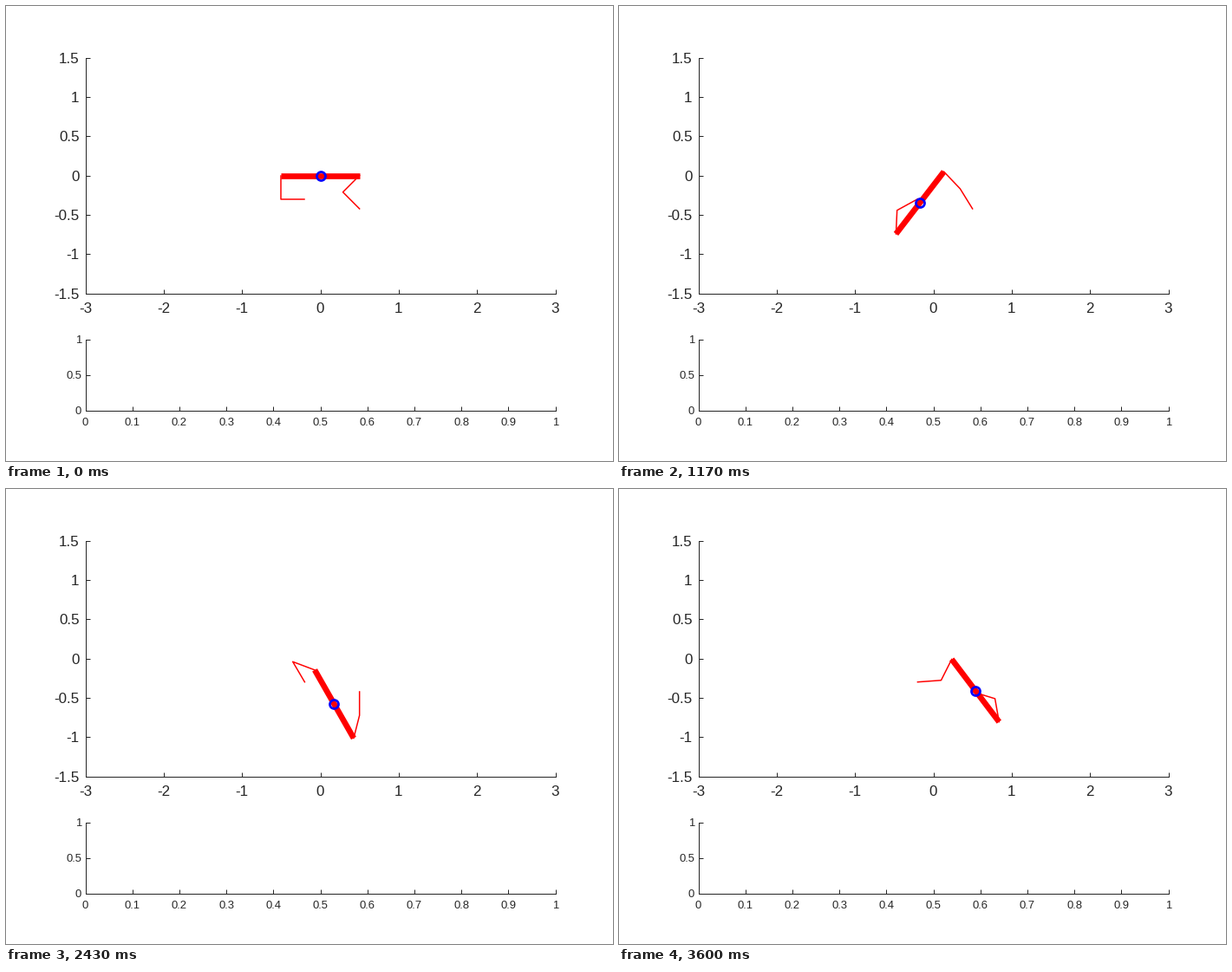
A matplotlib script that plays this animation: 700x525 px, repeating every 3.63 s.

```python
import numpy as np
import matplotlib.pyplot as plt
from matplotlib.animation import FuncAnimation

W, H, DPI = 700, 525, 100
FRAMES, INTERVAL = 121, 30
PT = 72 / DPI  # points per pixel
INK = "#262626"

LINK, BODY = 0.3, 1.0
FOOT_L = np.array([-0.2, -0.3])
FOOT_R = np.array([0.5, -0.4243])

# frame, body centre x, y, body tilt in degrees
KEYS = [
    (0, 0, 0, 0),
    (6, .06, -.147, -2),
    (10, .189, -.324, -12),
    (13, .287, -.6, -21),
    (15, .37, -.705, -23),
    (18, .43, -.65, -18),
    (20, .404, -.587, -15.6),
    (23, .41, -.58, 13),
    (27, .343, -.459, 45),
    (36, -.255, -.39, 50),
    (39, -.171, -.348, 52.3),
    (46, .166, -.404, 52),
    (54, .581, -.586, 21.5),
    (58, .44, -.775, -7),
    (62, .072, -.819, -23),
    (65, -.164, -.73, -25.4),
    (69, -.232, -.249, -47),
    (72, -.006, -.232, -58),
    (81, .177, -.581, -60.2),
    (86, .348, -.57, -57.7),
    (94, .216, -.38, -48),
    (98, .133, -.155, -40),
    (101, .105, -.06, -41),
    (105, -.039, -.21, -30),
    (108, -.01, -.283, -20),
    (114, .235, -.494, -36),
    (120, .537, -.409, -52.8),
]
# moments when a knee snaps to its other side
FLIPS_L = (11, 70, 99)
FLIPS_R = (34, 56, 84, 99)


def unit(angle):
    return np.array([np.cos(angle), np.sin(angle)])


def knee_side(frame, flips):
    return (-1) ** sum(frame > t for t in flips)


def leg_angles(foot, hip, side):
    """Directions foot-to-knee and knee-to-hip."""
    dx, dy = hip - foot
    reach = min(np.hypot(dx, dy) / (2 * LINK), 1)
    bend = side * np.arccos(reach)
    aim = np.arctan2(dy, dx)
    return aim + bend, aim - bend


def chain_angles(key):
    frame, x, y, tilt = key
    tilt = np.radians(tilt)
    half = BODY / 2 * unit(tilt)
    centre = np.array([x, y])
    left = leg_angles(FOOT_L, centre - half, knee_side(frame, FLIPS_L))
    right = leg_angles(FOOT_R, centre + half, knee_side(frame, FLIPS_R))
    return [*left, tilt, *right]


TIMES = np.array([key[0] for key in KEYS], float)
ANGLES = np.unwrap([chain_angles(key) for key in KEYS], axis=0)
SLOPES = np.gradient(ANGLES, TIMES, axis=0)
LENGTHS = np.array([LINK, LINK, BODY, -LINK, -LINK])
MOBILITY = np.diag([1, 1, 0.15, 1, 1])


def blend(frame):
    """Cubic Hermite interpolation of the link angles."""
    i = min(np.searchsorted(TIMES, frame, side="right") - 1, len(TIMES) - 2)
    span = TIMES[i + 1] - TIMES[i]
    s = (frame - TIMES[i]) / span
    ease = s * s * (3 - 2 * s)
    return (ANGLES[i] * (1 - ease) + ANGLES[i + 1] * ease
            + span * s * (1 - s) ** 2 * SLOPES[i]
            - span * s * s * (1 - s) * SLOPES[i + 1])


def close_chain(q):
    """Nudge the angles until the chain meets both feet."""
    for _ in range(40):
        gap = FOOT_L - FOOT_R + unit(q) @ LENGTHS
        jac = np.array([-np.sin(q), np.cos(q)]) * LENGTHS
        push = MOBILITY @ jac.T
        q = q - push @ np.linalg.solve(jac @ push + 1e-4 * np.eye(2), gap)
    return q


def pose(frame):
    a, b, _, d, e = close_chain(blend(frame))[[0, 1, 2, 4, 3]]
    knee_l = FOOT_L + LINK * unit(a)
    knee_r = FOOT_R + LINK * unit(e)
    hip_l = knee_l + LINK * unit(b)
    hip_r = knee_r + LINK * unit(d)
    return knee_l, hip_l, hip_r, knee_r


plt.rcParams["font.family"] = "Liberation Sans"
plt.rcParams["axes.unicode_minus"] = False
fig = plt.figure(figsize=(W / DPI, H / DPI), dpi=DPI, facecolor="white")


def make_axes(top, bottom, xticks, yticks, size, xpad, ypad):
    ax = fig.add_axes([91.5 / W, 1 - bottom / H, 542 / W, (bottom - top) / H])
    ax.set_xlim(xticks[0], xticks[-1])
    ax.set_ylim(yticks[0], yticks[-1])
    ax.set_xticks(xticks, [f"{v:g}" for v in xticks])
    ax.set_yticks(yticks, [f"{v:g}" for v in yticks])
    ax.tick_params(direction="in", length=5.4 * PT, width=PT, color=INK,
                   labelcolor=INK, labelsize=size * PT)
    ax.tick_params(axis="x", pad=xpad * PT)
    ax.tick_params(axis="y", pad=ypad * PT)
    ax.spines[["top", "right"]].set_visible(False)
    for side in ("left", "bottom"):
        ax.spines[side].set(linewidth=PT, color=INK)
    return ax


stage = make_axes(59.5, 331.5, np.arange(-3, 4),
                  np.arange(-3, 4) / 2, 17, 11, 7)
make_axes(384.5, 466.5, np.arange(11) / 10, np.arange(3) / 2, 13, 8.5, 4.5)

body, = stage.plot([], [], color="red", lw=6.67 * PT, solid_capstyle="butt")
legs = [stage.plot([], [], color="red", lw=1.5 * PT)[0] for _ in range(2)]
hub, = stage.plot([], [], "o", ms=10 * PT, mew=2.7 * PT, mfc="none",
                  mec="blue")


def update(frame):
    knee_l, hip_l, hip_r, knee_r = pose(frame)
    body.set_data(*np.transpose([hip_l, hip_r]))
    legs[0].set_data(*np.transpose([hip_l, knee_l, FOOT_L]))
    legs[1].set_data(*np.transpose([hip_r, knee_r, FOOT_R]))
    mid = (hip_l + hip_r) / 2
    hub.set_data([mid[0]], [mid[1]])
    return body, *legs, hub


anim = FuncAnimation(fig, update, frames=FRAMES, interval=INTERVAL,
                     repeat=True, repeat_delay=0)
plt.show()
```
